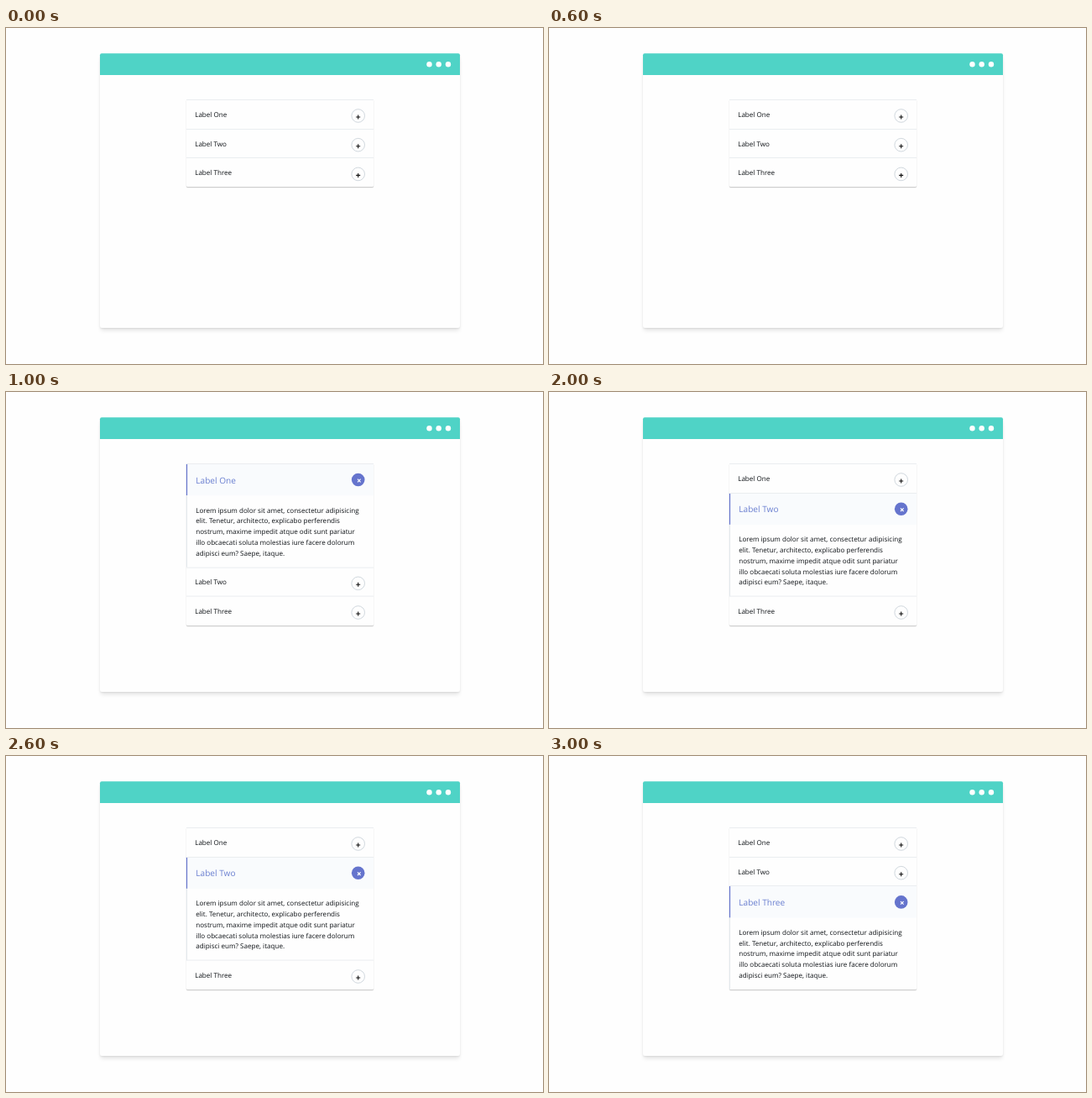
An HTML page for the animation above (4 s loop, 640 by 400 pixels).

```html
<!DOCTYPE html>
<html lang="en">
<head>
<meta charset="utf-8">
<title>Accordion</title>
<style>
  html, body { margin: 0; width: 100%; height: 100%; overflow: hidden; background: #fefefe; }
  .stage { position: relative; width: 640px; height: 400px; overflow: hidden; }
  .window, .panel, svg { position: absolute; }
  .window {
    left: 112px; top: 31px; width: 429px; height: 326px;
    border-radius: 2px; background: #fefefe;
    box-shadow: 0 4px 5px -1px rgba(0, 0, 0, .1), 0 1px 2px rgba(0, 0, 0, .08);
  }
  .panel {
    left: 215px; top: 85px; width: 223px; height: 104.4px;
    border-radius: 1.5px; background: #fefefe;
    box-shadow: 0 1px 1px rgba(0, 0, 0, .17), 0 1px 2px rgba(0, 0, 0, .07);
    animation: grow 4s step-end infinite;
  }
  svg { left: 0; top: 0; }
  text { font: 8.08px "Open Sans", "Noto Sans", sans-serif; fill: #101418; text-rendering: geometricPrecision; }
  .title { font-size: 10.1px; fill: #6a7fd0; }
  .rule { stroke: #eaedf0; }

  .open, .shut { animation: open 4s step-end infinite; animation-delay: calc((var(--i) - 4) * 1s); }
  .shut { animation-name: shut; }
  .second { animation: push-second 4s step-end infinite; }
  .third { animation: push-third 4s step-end infinite; }

  @keyframes open { 0% { visibility: visible; } 25%, 100% { visibility: hidden; } }
  @keyframes shut { 0% { visibility: hidden; } 25%, 100% { visibility: visible; } }
  @keyframes grow { 0% { height: 104.4px; } 25%, 100% { height: 193.2px; } }
  @keyframes push-second {
    0%, 50%, 100% { transform: none; }
    25% { transform: translateY(88.6px); }
  }
  @keyframes push-third {
    0%, 75%, 100% { transform: none; }
    25% { transform: translateY(88.6px); }
  }
</style>
</head>
<body>
<div class="stage">
  <div class="window"></div>
  <div class="panel"></div>
  <svg width="640" height="400" viewBox="0 0 640 400">
    <defs>
      <g id="plus">
        <circle cx="419.7" cy="104.5" r="7.8" fill="#fefefe" stroke="#bcc6cf" stroke-width=".7"/>
        <path d="M417.2 106h5M419.7 103.5v5" stroke="#111" stroke-width="1.1"/>
      </g>
      <g id="head">
        <rect x="215" y="85.5" width="223" height="37.7" fill="#f9fbfd"/>
        <path d="M215.5 85.5v37.7" stroke="#6574cd" stroke-width="1.2"/>
        <path d="M215.5 123.2v85.4" stroke="#e3e8ec"/>
        <circle cx="419.7" cy="104.5" r="7.8" fill="#6574cd"/>
        <path d="M419 103.7l3.6 3.6M422.6 103.7l-3.6 3.6" stroke="#fff" stroke-width="1.2"/>
      </g>
      <text id="copy">
        <tspan x="226.2" y="143.5">Lorem ipsum dolor sit amet, consectetur adipisicing</tspan>
        <tspan x="226.2" y="156.3">elit. Tenetur, architecto, explicabo perferendis</tspan>
        <tspan x="226.2" y="169.1">nostrum, maxime impedit atque odit sunt pariatur</tspan>
        <tspan x="226.2" y="181.9">illo obcaecati soluta molestias iure facere dolorum</tspan>
        <tspan x="226.2" y="194.7">adipisci eum? Saepe, itaque.</tspan>
      </text>
    </defs>

    <path d="M112 56V32.3q0-2 2-2h425q2 0 2 2V56z" fill="#4fd3c6"/>
    <g fill="#fff">
      <circle cx="504.5" cy="43.2" r="3.2"/>
      <circle cx="515.7" cy="43.2" r="3.2"/>
      <circle cx="527" cy="43.2" r="3.2"/>
    </g>

    <g style="--i: 1">
      <g class="shut"><text x="225.2" y="106">Label One</text><use href="#plus"/></g>
      <g class="open"><use href="#head"/><text class="title" x="226.3" y="108.7">Label One</text><use href="#copy"/></g>
      <path class="rule" d="M215 85.5h223"/>
    </g>

    <g class="second" style="--i: 2">
      <g transform="translate(0 34.7)">
        <g class="shut"><text x="225.2" y="106">Label Two</text><use href="#plus"/></g>
        <g class="open"><use href="#head"/><text class="title" x="226.3" y="108.7">Label Two</text><use href="#copy"/></g>
        <path class="rule" d="M215 85.8h223"/>
      </g>
    </g>

    <g class="third" style="--i: 3">
      <g transform="translate(0 69.4)">
        <g class="shut"><text x="225.2" y="106">Label Three</text><use href="#plus"/></g>
        <g class="open"><use href="#head"/><text class="title" x="226.3" y="108.7">Label Three</text><use href="#copy"/></g>
        <path class="rule" d="M215 85.1h223"/>
      </g>
    </g>
  </svg>
</div>
</body>
</html>
```
